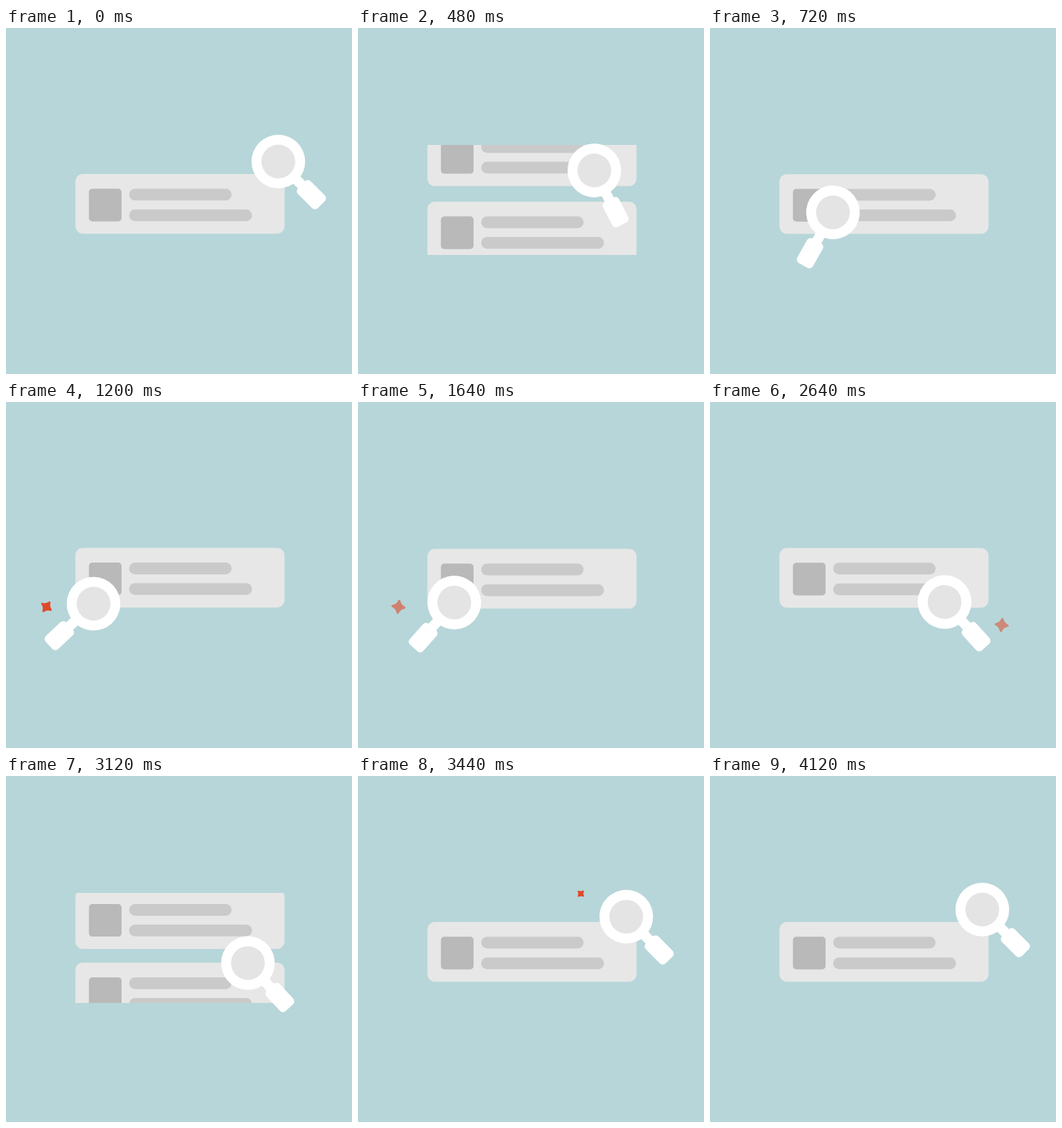
These frames come from a looping animation (500 px wide and 500 px high, 4.2 s). An HTML page:

```html
<!DOCTYPE html>
<html lang="en">
<head>
<meta charset="utf-8">
<title>Searching</title>
<style>
  html, body { margin: 0; width: 100%; height: 100%; overflow: hidden; background: #b7d6d9; }
  svg { display: block; width: 100%; height: 100%; }
</style>
</head>
<body>
<svg viewBox="0 0 500 500">
  <defs>
    <clipPath id="view"><rect x="90" y="169" width="330" height="159"/></clipPath>
    <g id="card">
      <rect x="100.3" y="211" width="302.2" height="86.3" rx="11" fill="#e7e7e7"/>
      <rect x="119.8" y="232.3" width="47.2" height="47.2" rx="5" fill="#b9b9b9"/>
      <rect x="178" y="232.3" width="148" height="17" rx="8.5" fill="#cacaca"/>
      <rect x="178" y="262.2" width="177.5" height="17" rx="8.5" fill="#cacaca"/>
    </g>
    <path id="spark" d="M8.7 0Q2.2 2.2 0 8.7Q-2.2 2.2 -8.7 0Q-2.2 -2.2 0 -8.7Q2.2 -2.2 8.7 0Z"
      fill="#e04a2a" stroke="#e04a2a" stroke-width="3" stroke-linejoin="round"/>
  </defs>
  <g clip-path="url(#view)">
    <use id="leaving" href="#card"/>
    <use id="coming" href="#card"/>
  </g>
  <g id="lens">
    <rect x="35" y="-7.3" width="18" height="14.6" fill="#fff"/>
    <rect x="47.3" y="-13" width="40.7" height="26" rx="6" fill="#fff"/>
    <circle r="38.8" fill="#fff"/>
    <circle r="24.4" fill="#e4e4e4"/>
  </g>
  <g id="sparks"></g>
</svg>
<script>
const LOOP = 4200;
const $ = id => document.getElementById(id);
const clamp = v => Math.min(1, Math.max(0, v));

// Same curve as cubic-bezier(.78, 0, .22, 1)
function ease(x) {
  let lo = 0, hi = 1;
  for (let i = 0; i < 24; i++) {
    const m = (lo + hi) / 2, n = 1 - m;
    if (2.34 * m * n * n + 0.66 * m * m * n + m ** 3 < x) lo = m; else hi = m;
  }
  return lo * lo * (3 - 2 * lo);
}

// Lens stops: x, y, handle angle
const A = [393.5, 193, 45], B = [126.5, 291.5, 137], C = [339, 289, 47.7];
const moves = [
  { start: 0, from: A, to: B, arch: 10 },
  { start: 1320, from: B, to: C, arch: 7 },
  { start: 2640, from: C, to: A, arch: 0 }
];
const MOVE = 1200;

const scrolls = [188, 1160, 1717, 2852];
const SCROLL = 560;

const SPARK = 840;
const sparks = [[920, 58.5, 296], [1910, 421.5, 322.2], [3280, 322, 170]].map(([start, x, y]) => {
  const el = document.createElementNS("http://www.w3.org/2000/svg", "use");
  el.setAttribute("href", "#spark");
  $("sparks").append(el);
  return { start, x, y, el };
});

function place(el, transform, opacity = 1) {
  el.setAttribute("transform", transform);
  el.setAttribute("opacity", opacity);
}

function drawCards(t) {
  const start = scrolls.find(s => t < s + SCROLL) ?? LOOP;
  const x = clamp((t - start) / SCROLL), p = ease(x);
  place($("leaving"), `translate(0 ${-114.6 * p})`, 1 - clamp((x - 0.55) / 0.2));
  place($("coming"), `translate(0 ${100 * (1 - p)})`, clamp((x - 0.25) / 0.2));
}

function drawLens(t) {
  const { start, from, to, arch } = moves.findLast(m => t >= m.start);
  const p = ease(clamp((t - start) / MOVE));
  const [x, y, angle] = from.map((v, i) => v + (to[i] - v) * p);
  place($("lens"), `translate(${x} ${y - 4 * arch * p * (1 - p)}) rotate(${angle})`);
}

function drawSpark({ start, x, y, el }, t) {
  const age = t - start;
  const live = age > 0 && age < SPARK;
  const size = live ? Math.sin(clamp(age / 400) * Math.PI / 2) : 0;
  const turn = 54 * (1 - age / SPARK);
  place(el, `translate(${x} ${y}) rotate(${turn}) scale(${size})`, live ? clamp((SPARK - age) / 200) : 0);
}

function draw(now) {
  const t = now % LOOP;
  drawCards(t);
  drawLens(t);
  sparks.forEach(s => drawSpark(s, t));
}

const begin = performance.now();
function tick() {
  draw(performance.now() - begin);
  requestAnimationFrame(tick);
}
tick();
</script>
</body>
</html>
```
